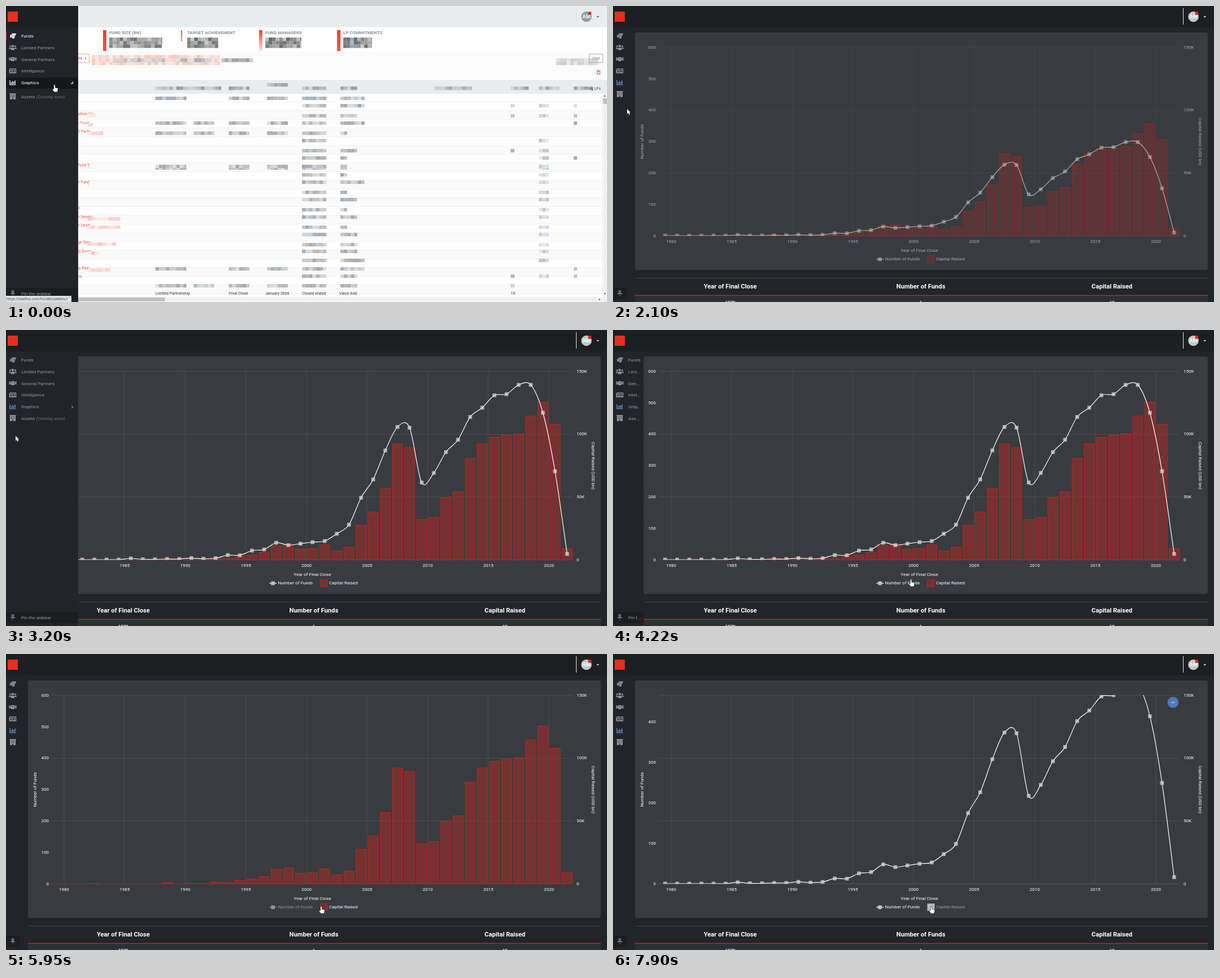
These frames come from a looping animation (1066x526 px, 7.99 s). An HTML page with a canvas:

```html
<!DOCTYPE html>
<html lang="en">
<head>
<meta charset="utf-8">
<title>Fund graphics</title>
<style>
html, body { margin: 0; width: 100%; height: 100%; overflow: hidden; background: #212529; }
canvas { display: block; }
</style>
</head>
<body>
<canvas id="stage" width="1066" height="526"></canvas>
<script>
const g = document.getElementById('stage').getContext('2d');
const LOOP = 7990, BASE = 408, TOP = 73, LEFT = 81, RIGHT = 1005, STEP = 21.5;
const RED = '#d3251c', GREY = '#96999c', BODY = '#212529', HEAD = '#1b1f22', PANEL = '#383b40';

// Heights at the default axis ranges, as pixel tops, one per year from 1979
const fundTops = [408, 408, 408, 408, 408, 408, 406, 407.5, 407.5, 407, 407, 405.3, 406.5, 405.5,
  400, 400.3, 392, 390, 378, 382.3, 379.7, 377, 375, 362, 346, 298, 265.5, 214, 172.3, 173.5, 271,
  254, 217, 195, 154.5, 138, 116, 114, 97.5, 97.5, 147, 251, 398];
const barTops = [408, 408, 408, 407.5, 408, 408, 408, 408, 408, 405.5, 408, 407.6, 407.5, 404.5,
  405.5, 402, 399.5, 395, 382.5, 379.5, 389, 388, 381.5, 392, 385.5, 346.5, 323, 281, 202, 208.5,
  336.5, 332.5, 297, 287, 227.5, 202, 190, 186, 184, 152.5, 127.5, 167, 387.5];

const clamp = v => Math.max(0, Math.min(1, v));
const out = v => 1 - (1 - clamp(v)) ** 3;
const span = (t, start, length) => clamp((t - start) / length);
const hash = (a, b) => { const s = Math.sin(a * 12.9898 + b * 78.233) * 43758.5453; return s - Math.floor(s); };

function rect(x, y, w, h, color) { g.fillStyle = color; g.fillRect(x, y, w, h); }

function disc(x, y, r, color) {
  g.fillStyle = color;
  g.beginPath(); g.arc(x, y, r, 0, 7); g.fill();
}

function text(str, x, y, size = 8, color = '#fff', align = 'left', style = '', family = 'Roboto') {
  g.font = `${style} ${size}px ${family}, sans-serif`;
  g.fillStyle = color; g.textAlign = align; g.textBaseline = 'middle';
  g.fillText(str, x, y + 0.4);
}

function path(points, color, width = 1, close = false) {
  g.beginPath();
  points.forEach(([x, y]) => g.lineTo(x, y));
  if (close) g.closePath();
  g.strokeStyle = color; g.lineWidth = width; g.stroke();
}

function turned(x, y, angle, draw) {
  g.save(); g.translate(x, y); g.rotate(angle); draw(); g.restore();
}

function clipped(x, y, w, h, draw) {
  g.save(); g.beginPath(); g.rect(x, y, w, h); g.clip(); draw(); g.restore();
}

// ---- shared page parts ----

const icons = [
  c => [-4, -1.5, 1].forEach((y, i) => { rect(-5 + (i < 1 ? 3 : 0), y, 8, 2, c); rect(1 - i, y + 2.6, 4, 1.4, c); }),
  c => { disc(0, -2.5, 2.2, c); disc(-4.5, -2, 1.5, c); disc(4.5, -2, 1.5, c); rect(-3.2, 0.6, 6.4, 4, c); rect(-6.5, 0.3, 2.6, 2.6, c); rect(3.9, 0.3, 2.6, 2.6, c); },
  c => { rect(-6.5, -3, 2, 5.5, c); rect(4.5, -3, 2, 5.5, c); g.beginPath(); g.ellipse(0, 0, 4, 3.6, 0, 0, 7); g.fill(); path([[-2, -1], [1, -1], [3, 1.5]], BODY, 0.8); },
  c => { g.strokeStyle = c; g.lineWidth = 1.4; g.strokeRect(-5, -3.3, 10.5, 7); rect(-6.5, -2, 1.2, 6, c); rect(-3, -1.5, 3, 2.2, c); rect(1, -1.5, 3, 0.9, c); rect(1, 0.2, 3, 0.9, c); rect(-3, 1.7, 7, 0.9, c); },
  c => { path([[-5, -4], [-5, 3.8], [5.5, 3.8]], c, 1.3); [3, 5, 3.5, 6].forEach((h, i) => rect(-3.2 + i * 2.2, 2.4 - h, 1.4, h, c)); },
  c => { rect(-5, -5, 10, 10, c); for (let i = 0; i < 6; i++) rect(-3.3 + (i % 3) * 2.6, i < 3 ? -3.2 : -0.4, 1.4, 1.4, BODY); rect(-1, 2.4, 2, 2.6, BODY); rect(-6, -5.5, 12, 1, c); },
  c => { rect(-3, -5, 6, 1.5, c); rect(-1.8, -4, 3.6, 4, c); rect(-4, -0.5, 8, 2, c); rect(-0.5, 1, 1, 4.5, c); }
];
const labels = ['Funds', 'Limited Partners', 'General Partners', 'Intelligence', 'Graphics', 'Assets', 'Pin the sidebar'];
const SOON = ' (Coming soon)';

function fit(str, room) {
  g.font = '8px Roboto, sans-serif';
  if (g.measureText(str).width <= room) return str;
  while (str && g.measureText(str + '...').width > room) str = str.slice(0, -1);
  return str + '...';
}

function sidebar(width, light, open) {
  rect(0, 38, width, 488, BODY);
  rect(0, 501, width, 20, '#1b1e21');
  if (light) { rect(0, 127, width, 20, '#15181b'); rect(0, 47, 1, 13, RED); }
  labels.forEach((label, i) => {
    const y = i === 6 ? 511 : 53.3 + i * 20.8 + (i === 5 ? open * 27 : 0);
    const lit = light && (i === 0 || i === 4);
    g.save(); g.translate(12, y - 0.5);
    icons[i](lit ? '#fff' : i === 4 ? '#7090cf' : i === 6 ? '#6e7174' : GREY);
    g.restore();
    if (width < 36) return;
    const whole = i === 5 ? label + SOON : label, shown = fit(whole, width - 31);
    const color = lit ? '#fff' : GREY;
    if (i === 5 && shown === whole) {
      text(label, 27, y, 8, color);
      text(SOON.trim(), 53.5, y, 8, '#6f7276', 'left', 'italic');
    } else text(shown, 27, y, 8, color);
  });
  if (open > 0.4) clipped(0, 147, width, 27 * open, () => text('Fundraising', 33, 163, 8, GREY));
  if (width > 122) turned(117.5, 136.8, open && Math.min(1, open * 3) * Math.PI / 2,
    () => path([[-1.2, -2.4], [1.2, 0], [-1.2, 2.4]], light ? '#fff' : GREY, 1.2));
}

function header(shift, light) {
  rect(0, 0, 1066, 38, light ? '#e9edf0' : HEAD);
  if (light) rect(0, 0, 128, 38, HEAD);
  rect(3, 10, 18, 18, '#e5301f');
  rect(1011 + shift, 4, 1, 29, light ? '#dcdfe2' : '#e6e6e6');
  disc(1029.5 + shift, 19, 9.3, light ? '#989b9d' : '#c3c6c8');
  text('AM', 1029.5 + shift, 19, 9.5, '#fff', 'center', '500');
  disc(1035.5 + shift, 13, 2.9, '#e32219');
  g.fillStyle = light ? '#555' : '#ccc';
  g.beginPath(); g.moveTo(1047.3 + shift, 18); g.lineTo(1052.3 + shift, 18); g.lineTo(1049.8 + shift, 20.8); g.fill();
}

function status(str, width, alpha = 1) {
  g.globalAlpha = alpha;
  rect(0, 515, width, 11, '#dee1e6');
  text(str, 1, 520.5, 6.25, '#3c4043', 'left', '', 'Open Sans');
  g.globalAlpha = 1;
}

// ---- blurred table page ----

function mosaic(x, y, w, h, tint = 0, strength = 1) {
  for (let i = 0; i * 6.2 < w; i++) for (let j = 0; j * 6.2 < h; j++) {
    const r = hash(x + i * 3.1, y + j * 7.7), v = 255 - (35 + 65 * r) * strength;
    const blue = (hash(i + x, y - j) - 0.4) * 16;
    rect(x + i * 6.2, y + j * 6.2, Math.min(6.3, w - i * 6.2), Math.min(6.3, h - j * 6.2),
      tint ? `rgb(250,${195 + 45 * r},${190 + 45 * r})` : `rgb(${v - blue},${v},${v + blue})`);
  }
}

const columns = { A: [265, 55], B: [333, 36], C: [395, 37], D: [463, 37], E: [525, 43], F: [593, 30], N: [895, 7], P: [945, 18], Q: [1007, 6] };
const rows = '164ACDEF 177EFNPQ 195EFNPQ 208ABCDEFQ 226ABCDEF 239EP 257EFNP 270EFPQ 285ACDEFP 300EFP 313EFP 331EFP 344EFP 362EFP 375EFP 393EFP 406EFP 424EFP 436EFP 452EFP 467ACDEFQ 480EFNPQ 497ABCDEFN'
  .split(' ').map(s => [+s.slice(0, 3), s.slice(3)]);
const names = [[192, 'sition Co', 160], [208, 't Trust', 154], [223, 'd Partn', 172], [283, 'Fund II', 148], [313, 'e Fund', 147],
  [359, 'd', 0], [375, 'e Develo', 203], [390, 'e Devel', 203], [420, 'ge Opp', 197], [436, 'ty Zone', 166], [466, 'ty Real', 185], [481, 'nd', 0]];

function tablePage(t) {
  rect(0, 0, 1066, 526, '#fff');
  header(0, true);
  ['FUND SIZE (BN)', 'TARGET ACHIEVEMENT', 'FUND MANAGERS', 'LP COMMITMENTS'].forEach((label, i) => {
    const x = 183 + i * 138.4;
    const fade = g.createLinearGradient(0, 43, 0, 80);
    fade.addColorStop(0, '#ef3a2d'); fade.addColorStop(1, i % 3 ? '#fde3e0' : '#f0564a');
    rect(x - 11, 43, i === 1 ? 2 : 6, i === 1 ? 20 : 37, fade);
    text(label, x, 47.5, 7.9, '#8b8e91', 'left', 'bold');
    mosaic(x, 56, [94, 55, 64, 51][i], 18.6, 0, 1.5);
  });
  rect(128, 81, 938, 49, '#fbfbfc');
  g.lineWidth = 1; g.strokeStyle = '#f0a8a2'; g.strokeRect(120.5, 85.5, 27, 15);
  text('es', 128, 93, 7, '#d8483e');
  path([[140, 91], [142, 93], [140, 95]], '#555');
  mosaic(152, 87, 228, 18, 1);
  mosaic(190, 93, 92, 7, 0, 0.8); mosaic(303, 93, 62, 7, 0, 0.8); mosaic(382, 93, 56, 7);
  mosaic(976, 93, 74, 12, 0, 0.5);
  g.strokeStyle = '#aaa'; g.strokeRect(1034.5, 85.5, 24, 15);
  text('mns', 1040, 93, 7, '#888');
  disc(1051, 118, 6.5, '#eceff1');
  g.strokeStyle = '#d06a60'; g.strokeRect(1049, 116, 4, 5); rect(1048, 114.5, 6, 1, '#d06a60');

  rect(128, 131, 938, 25, '#e9edef');
  [[265, 117], [395, 37], [463, 37], [525, 43], [593, 30], [760, 67], [895, 32], [945, 37], [1007, 34]]
    .forEach(([x, w], i) => mosaic(x, i === 2 ? 137 : 143, w, 6.2));
  text('ng LPs', 1055, 146.5, 7, '#444', 'right');
  for (let y = 170; y < 515; y += 15.5) {
    if (Math.round((y - 170) / 15.5) % 2) rect(128, y, 930, 15.5, '#fafafa');
    rect(128, y, 930, 0.8, '#eeeff0');
  }
  rows.forEach(([y, keys]) => [...keys].forEach(k => {
    const [x, w] = columns[k];
    const width = k === 'F' ? [12, 30, 43][Math.floor(hash(y, 3) * 3)] : w;
    mosaic(x, y - 3, width, y === 285 ? 9 : 6.2, 0, k === 'P' ? 0.6 : 0.9);
  }));
  names.forEach(([y, str, end]) => {
    text(str, 127, y, 7, '#e8594d');
    if (end) mosaic(145, y, end - 145, 6.2, 1);
  });
  [['Limited Partnership', 265], ['Final Close', 395], ['January 2006', 460], ['Closed ended', 525], ['Value Add', 591], ['15', 895]]
    .forEach(([str, x]) => text(str, x, 511, 7, '#333'));
  rect(1058, 156, 8, 370, '#f1f1f1'); rect(1059, 164, 7, 10, '#c1c1c1');
  rect(128, 517, 938, 8, '#f1f1f1'); rect(128, 518, 154, 7, '#c1c1c1');
  text('▴', 1062, 159, 6, '#555', 'center'); text('▾', 1062, 511, 6, '#555', 'center'); text('▸', 1053, 521, 6, '#555', 'center');

  rect(0, 0, 128, 526, BODY); rect(0, 0, 128, 38, HEAD); rect(3, 10, 18, 18, '#e5301f');
  sidebar(128, true, 0.15 + 0.85 * out((t - 90) / 380));
  if (t < 700) status('https://realfinx.com/Fund#subMenu1', 116);
  else status('Waiting for realfinx.com...', 116 + 241 * span(t, 690, 130));
}

// ---- dark pages ----

function panel(width) {
  g.fillStyle = PANEL;
  g.beginPath(); g.roundRect(39, 47, width, 422, 4); g.fill();
}

function loadingPage(t) {
  rect(0, 0, 1066, 526, BODY);
  header(9.5);
  panel(1025.5);
  rect(25, 496, 1041, 1, '#34383c');
  text('© 2021 -', 39, 511, 8, '#fff', 'left', '500');
  text('Halvern Analytics', 70.5, 511, 8, '#e02219', 'left', '500');
  sidebar(25, false, 0);
  if (t < 1640) status('Waiting for realfinx.com...', 357, 1 - span(t, 1460, 180));
}

const px = i => 92.3 + i * STEP;

function fundLine(grow, max) {
  const p = fundTops.map((y, i) => [px(i), BASE - (BASE - y) * grow * 600 / max]);
  const at = i => p[Math.max(0, Math.min(p.length - 1, i))], k = 0.16;
  g.beginPath(); g.moveTo(...p[0]);
  for (let i = 0; i < p.length - 1; i++) {
    const [a, b, c, d] = [at(i - 1), p[i], p[i + 1], at(i + 2)];
    g.bezierCurveTo(b[0] + (c[0] - a[0]) * k, b[1] + (c[1] - a[1]) * k,
      c[0] - (d[0] - b[0]) * k, c[1] - (d[1] - b[1]) * k, ...c);
  }
  g.strokeStyle = '#fff'; g.lineWidth = 1.2; g.stroke();
  p.forEach(([x, y]) => rect(x - 3.3, y - 3.3, 6.6, 6.6, 'rgba(215,215,215,.75)'));
}

function chart(t) {
  const lineBack = t >= 7120, u = span(t, 7120, 780);
  const max = lineBack ? 600 - 585 * u + 450 * u * u : 600;
  const fade = span(t, 1763, 600);
  const lineOff = out((t - 4660) / 800), barOff = out((t - 6240) / 800);
  const lineGrow = lineBack ? out((t - 7135) / 1500) : out((t - 1763) / 1500) * (1 - lineOff);
  const lineAlpha = lineBack ? clamp(lineGrow * 1.5) : 1 - lineOff;
  const barGrow = out((t - 1763) / 1000) * (1 - barOff);
  const funds = t < 4660 || lineBack, capital = t < 6240;

  g.globalAlpha = fade;
  [73, 184.7, 296.3, 408].forEach((y, i) => {
    rect(LEFT, Math.round(y), RIGHT - LEFT, 1, i < 3 ? '#484b50' : '#54575b');
    text(['150K', '100K', '50K', '0'][i], 1012, y);
  });
  for (let i = 0; i < 9; i++) {
    const x = 102.9 + i * STEP * 5;
    rect(Math.round(x) - 0.5, TOP, 1, BASE - TOP + 1, '#4a4d52');
    text(1980 + i * 5, x, 418.7, 8, '#fff', 'center');
  }
  for (let v = 0; v <= max + 1; v += 100) text(v, 76, BASE - (BASE - TOP) * v / max, 8, '#fff', 'right');
  turned(51.5, 241, -Math.PI / 2, () => text('Number of Funds', 0, 0, 8, '#fff', 'center'));
  turned(1042, 241, Math.PI / 2, () => text('Capital Raised (USD bn)', 0, 0, 8, '#fff', 'center'));
  text('Year of Final Close', 543.5, 433.8, 8, '#fff', 'center');

  g.globalAlpha = fade * (1 - barOff);
  barTops.forEach((top, i) => {
    const h = (BASE - top) * barGrow, x = px(i) - 8.9;
    rect(x, BASE + 0.5 - h, 18, h, 'rgba(226,33,24,.37)');
    g.strokeStyle = h < 0.3 ? '#8a2c28' : '#bb261e'; g.lineWidth = 1;
    g.strokeRect(x, BASE + 0.5 - h, 18, h);
  });
  if (lineAlpha > 0) {
    g.globalAlpha = fade * lineAlpha;
    clipped(LEFT, TOP, RIGHT - LEFT, BASE - TOP + 0.5, () => fundLine(lineGrow, max));
  }

  g.globalAlpha = fade;
  rect(467, 449.4, 13, 1.2, funds ? '#fff' : GREY);
  rect(470.2, 446.8, 6.5, 6.5, funds ? '#c4c5c6' : GREY);
  text('Number of Funds', 482.5, 449.7, 8, funds ? '#fff' : GREY);
  rect(557.5, 443.5, 13, 13, capital ? 'rgba(226,33,24,.37)' : '#b9babc');
  if (capital) { g.strokeStyle = '#a52a23'; g.strokeRect(557.5, 443.5, 13, 13); }
  text('Capital Raised', 573, 449.7, 8, capital ? '#fff' : GREY);
  g.globalAlpha = 1;
  if (max < 598) {
    disc(993.3, 86, 9.8, '#5478bb');
    rect(990.6, 85.5, 5.6, 1, '#fff');
  }
}

function chartPage(t) {
  rect(0, 0, 1066, 526, BODY);
  header(0);
  panel(1016);
  chart(t);
  rect(39, 483, 1016, 1, '#3c4044');
  rect(39, 515, 1016, 11, '#2c3034');
  rect(39, 513.5, 1016, 1.6, '#c42127');
  [['Year of Final Close', '1979', 208], ['Number of Funds', '1', 546], ['Capital Raised', '10', 885]].forEach(([title, value, x]) => {
    text(title, x, 498.3, 11.2, '#fff', 'center', 'bold');
    text(value, x, 526.2, 8, '#fff', 'center', '500');
  });
  const wide = out((t - 2590) / 300) * (1 - out((t - 4122) / 290));
  sidebar(25 + 103 * wide, false, 0);
}

// ---- pointer ----

const route = [[0, 86, 140], [90, 86, 140], [470, 93, 163], [1780, 93, 163], [2100, 25, 183], [2490, 17, 188], [3420, 17, 188],
  [4200, 528.5, 443], [4530, 528.5, 443], [4540, 525.5, 440], [4690, 525.5, 440], [5470, 555, 443], [5700, 555, 442],
  [5780, 556, 445], [5950, 559, 448.5], [6100, 559, 448.5], [6110, 564.5, 448.5], [LOOP, 564.5, 448.5]];
const hand = new Path2D('M-1 .8Q0-.6 1 .8V5L5 6Q6 6.4 6 7.5L5 12.5H-.5L-3.4 8.2Q-3.2 6.6-1 8Z');
const arrow = new Path2D('M0 0V9L2.1 7.2 3.6 10.4 5.2 9.7 3.8 6.6H6.4Z');

function pointer(t) {
  const n = route.findIndex(k => k[0] > t), [a, b] = [route[n - 1], route[n]];
  const s = (t - a[0]) / (b[0] - a[0]);
  const shape = t > 1850 && t < 4130 ? arrow : hand;
  g.save();
  g.translate(a[1] + (b[1] - a[1]) * s, a[2] + (b[2] - a[2]) * s);
  g.strokeStyle = '#111'; g.lineWidth = 1.2; g.stroke(shape);
  g.fillStyle = '#fff'; g.fill(shape);
  g.restore();
}

const begin = performance.now();
function frame() {
  const t = (performance.now() - begin) % LOOP;
  (t < 1070 ? tablePage : t < 1780 ? loadingPage : chartPage)(t);
  pointer(t);
  requestAnimationFrame(frame);
}
frame();
</script>
</body>
</html>
```
